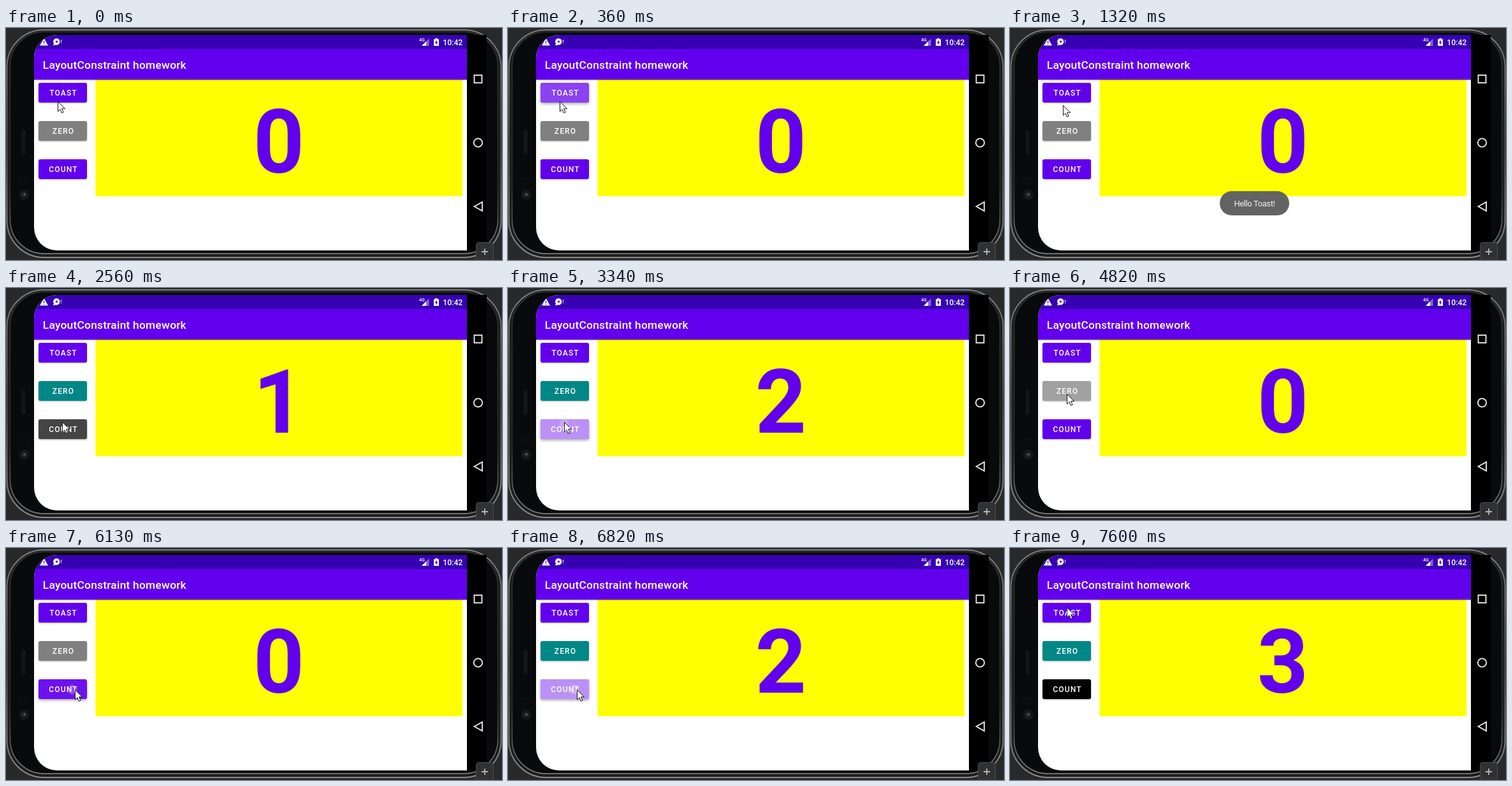
Animation, 778 px wide and 364 px high, one loop 8 s. Source, as an HTML page:

```html
<!DOCTYPE html>
<html lang="en">
<head>
<meta charset="utf-8">
<title>Counter app</title>
<style>
html, body { margin: 0; width: 100%; height: 100%; overflow: hidden; background: #27292b; }
svg { display: block; width: 778px; height: 364px; font-family: Roboto, sans-serif; }

.icon { fill: none; stroke: #eee; stroke-width: 1.8; }
.title { font-size: 17.4px; font-weight: 500; letter-spacing: .0125em; }
.label { font-size: 12.1px; font-weight: 500; letter-spacing: .0893em; text-anchor: middle; }
.digits { font-size: 140px; font-weight: 700; text-anchor: middle; fill: #6200ee; }
.button, .wash { x: 51px; width: 76px; height: 31px; rx: 3px; }
.button { filter: drop-shadow(0 1px 1px rgba(0,0,0,.3)); }
.wash { fill: #fff; opacity: 0; }

/* Every change is a hard step within the 8 s loop. */
.anim { animation: 8s step-end infinite; }
#toastBtn { fill: #6200ee; animation-name: toastLift; }
#zeroBtn { fill: #808080; animation-name: zeroColor, zeroLift; }
#countBtn { fill: #6200ee; animation-name: countColor, countLift; }
#toastWash { animation-name: toastWash; }
#zeroWash { animation-name: zeroWash; }
#countWash { animation-name: countWash; }
#spot { opacity: 0; animation-name: spot; }
#strip { animation-name: count; }
#toast { opacity: 0; animation-name: toast; }
#cursor { animation-name: cursor; }

@keyframes count {
  0%, 60.25% { transform: translateY(0); }
  30.5%, 78.5% { transform: translateY(-200px); }
  38.75%, 81.875% { transform: translateY(-400px); }
  43.625%, 87.125%, 100% { transform: translateY(-600px); }
}
@keyframes countColor {
  0%, 38.75%, 60.25%, 81.875% { fill: #6200ee; }
  30.5%, 43.625%, 78.5%, 87.125%, 100% { fill: #000; }
}
@keyframes zeroColor {
  0%, 60.25% { fill: #808080; }
  30.5%, 78.5%, 100% { fill: #018786; }
}
@keyframes toastLift {
  1.5% { filter: drop-shadow(0 2px 2px rgba(0,0,0,.35)); }
  0%, 6%, 100% { filter: drop-shadow(0 1px 1px rgba(0,0,0,.3)); }
}
@keyframes zeroLift {
  58.375% { filter: drop-shadow(0 2px 2px rgba(0,0,0,.35)); }
  0%, 60.25%, 100% { filter: drop-shadow(0 1px 1px rgba(0,0,0,.3)); }
}
@keyframes countLift {
  29%, 37.25%, 76.625% { filter: drop-shadow(0 2px 2px rgba(0,0,0,.35)); }
  32% { filter: drop-shadow(0 1px 1.5px rgba(0,0,0,.35)); }
  0%, 33.875%, 45.125%, 87.125%, 100% { filter: drop-shadow(0 1px 1px rgba(0,0,0,.3)); }
}
@keyframes toastWash {
  1.5% { opacity: .07; }
  3.125%, 4.625% { opacity: .26; }
  6% { opacity: .12; }
  0%, 7.5%, 100% { opacity: 0; }
}
@keyframes zeroWash {
  58.375% { opacity: .07; }
  60.25% { opacity: .26; }
  62.125% { opacity: .12; }
  0%, 63.625%, 100% { opacity: 0; }
}
@keyframes countWash {
  29%, 37.25%, 76.625% { opacity: .07; }
  30.5%, 32%, 38.75%, 40.25%, 45.125%, 78.5%, 80%, 81.875%, 87.125% { opacity: .27; }
  33.875%, 47%, 89% { opacity: .12; }
  41.75%, 85.25% { opacity: .57; }
  43.625%, 83.375% { opacity: .36; }
  0%, 35.375%, 48.625%, 90.5%, 100% { opacity: 0; }
}
@keyframes spot {
  1.5% { opacity: .25; transform: translate(82px, 109px); }
  29%, 37.25%, 41.75% { opacity: .2; transform: translate(88px, 213px); }
  58.375% { opacity: .25; transform: translate(89px, 166px); }
  76.625%, 85.25% { opacity: .25; transform: translate(104px, 222px); }
  0%, 3.125%, 30.5%, 38.75%, 43.625%, 60.25%, 78.5%, 87.125%, 100% { opacity: 0; transform: none; }
}
@keyframes toast {
  4.625% { opacity: .5; }
  6% { opacity: .9; }
  7.5% { opacity: 1; }
  29% { opacity: .8; }
  30.5% { opacity: .3; }
  0%, 32%, 100% { opacity: 0; }
}
@keyframes cursor {
  0% { transform: translate(81px, 115px); }
  16.5% { transform: translate(83px, 121px); }
  18.125% { transform: translate(94px, 158px); }
  19.875% { transform: translate(95px, 185px); }
  21.375% { transform: translate(95px, 208px); }
  23% { transform: translate(93px, 216px); }
  24.5% { transform: translate(90px, 213px); }
  26% { transform: translate(88px, 210px); }
  47% { transform: translate(91px, 196px); }
  48.625% { transform: translate(93px, 171px); }
  50.5% { transform: translate(90px, 166px); }
  52.25% { transform: translate(89px, 166px); }
  67% { transform: translate(100px, 194px); }
  68.875% { transform: translate(105px, 211px); }
  70.375% { transform: translate(109px, 221px); }
  71.875% { transform: translate(108px, 222px); }
  90.5% { transform: translate(107px, 203px); }
  92% { transform: translate(100px, 145px); }
  93.5% { transform: translate(92px, 106px); }
  95%, 100% { transform: translate(89px, 93px); }
}
</style>
</head>
<body>
<svg viewBox="0 0 778 364">
  <defs>
    <clipPath id="screen"><path d="M723 11H80A36 36 0 0 0 44 47V313A36 36 0 0 0 80 349H723Z"/></clipPath>
    <clipPath id="panel"><rect x="141" y="82" width="575" height="182"/></clipPath>
    <clipPath id="buttons">
      <rect x="51" y="86" width="76" height="31" rx="3"/>
      <rect x="51" y="146" width="76" height="31" rx="3"/>
      <rect x="51" y="206" width="76" height="31" rx="3"/>
    </clipPath>
    <linearGradient id="rim" x2="0" y2="1">
      <stop stop-color="#808080"/><stop offset=".5" stop-color="#4c4c4c"/><stop offset="1" stop-color="#8c8c8c"/>
    </linearGradient>
    <linearGradient id="edge" x2="0" y2="1">
      <stop stop-color="#333"/><stop offset=".7" stop-color="#2a2a2a"/><stop offset="1" stop-color="#8a8a8a"/>
    </linearGradient>
  </defs>

  <!-- Phone body -->
  <rect width="778" height="364" fill="#27292b"/>
  <rect x="1.5" y="3" width="775" height="357" rx="58" fill="#1c1c1c" stroke="url(#rim)" stroke-width="2"/>
  <rect x="6.500" y="6" width="765" height="348" rx="53" fill="#090a0b" stroke="url(#edge)" stroke-width="1.500"/>
  <rect x="723" y="11" width="31" height="338" fill="#000"/>
  <rect x="25.500" y="160.500" width="4" height="37" rx="2" fill="#141414" stroke="#1d1d1d"/>
  <ellipse cx="28" cy="240" rx="8" ry="4.500" fill="#0b0b0b" stroke="#161616"/>
  <circle cx="28.500" cy="261.500" r="8.500" fill="#151515"/>
  <circle cx="28.500" cy="261.500" r="4" fill="#262626"/>
  <circle cx="29" cy="261" r="1.500" fill="#666"/>

  <!-- Navigation -->
  <g class="icon">
    <rect x="734.500" y="74" width="12" height="12"/>
    <circle cx="740.500" cy="180" r="6.700"/>
    <path d="M734.500 280 747 273V287Z"/>
  </g>

  <g clip-path="url(#screen)">
    <rect x="44" y="11" width="679" height="338" fill="#fff"/>
    <rect x="140.500" y="81" width="575.500" height="183" fill="#ff0"/>
    <rect x="44" y="81" width="679" height="1" opacity=".25"/>
    <rect x="44" y="82" width="679" height="1" opacity=".08"/>
    <rect x="44" y="33" width="679" height="48" fill="#6200ee"/>
    <rect x="44" y="11" width="679" height="22" fill="#3700b3"/>

    <!-- Status bar -->
    <g fill="#fff">
      <path d="M59.500 16 66 27.500H53Z"/>
      <path d="M59.500 20V23.500M59.500 24.700V26" stroke="#3700b3" stroke-width="1.300"/>
      <path d="M74 27.500 75 24.500A5.200 5.200 0 1 1 78 26.500Z"/>
      <circle cx="79.500" cy="21.300" r="1.600" fill="#3700b3"/>
      <path d="M86.500 18.500V22M86.500 23V24.300" stroke="#fff"/>
      <text x="648" y="21" font-size="7" font-weight="500">4G</text>
      <path d="M663.500 16.500V28H652Z" opacity=".4"/>
      <path d="M659 21V28H652Z"/>
      <path d="M671 17.500H673.500V16H676.500V17.500H679V28H671Z"/>
      <path d="M675.700 18.800 672.800 23.300H674.500V26.800L677.300 22.200H675.700Z" fill="#3700b3"/>
      <text x="685.300" y="27" font-size="12.200" font-weight="500">10:42</text>
      <text class="title" x="57.800" y="64">LayoutConstraint homework</text>
    </g>

    <g clip-path="url(#panel)">
      <g id="strip" class="digits anim">
        <text x="428" y="226.500">0</text>
        <text x="428" y="426.500">1</text>
        <text x="428" y="626.500">2</text>
        <text x="428" y="826.500">3</text>
      </g>
    </g>

    <!-- Buttons -->
    <rect id="toastBtn" class="button anim" y="86"/>
    <rect id="zeroBtn" class="button anim" y="146"/>
    <rect id="countBtn" class="button anim" y="206"/>
    <rect id="toastWash" class="wash anim" y="86"/>
    <rect id="zeroWash" class="wash anim" y="146"/>
    <rect id="countWash" class="wash anim" y="206"/>
    <g clip-path="url(#buttons)"><circle id="spot" class="anim" r="7.500" fill="#fff"/></g>
    <g class="label" fill="#fff">
      <text x="90" y="106">TOAST</text>
      <text x="90" y="166">ZERO</text>
      <text x="90" y="226">COUNT</text>
    </g>

    <g id="toast" class="anim">
      <rect x="329" y="256" width="109" height="38" rx="19" fill="#636363"/>
      <text x="383.500" y="280" font-size="13" letter-spacing="-.4" text-anchor="middle" fill="#f4f4f4">Hello Toast!</text>
    </g>
  </g>

  <!-- Expand button -->
  <path d="M737.500 364V340.500A4 4 0 0 1 741.500 336.500H760.500A4 4 0 0 1 764.500 340.500V364" fill="#2f3133" stroke="#4a4c4e"/>
  <path d="M746 351H756M751 346V356" stroke="#b4b6b8" stroke-width="1.800"/>

  <path id="cursor" class="anim" d="M.5 .5V16L4 12.700 6.400 18.300 9 17.200 6.600 11.700H11.500Z" fill="#fff" stroke="#111"/>
</svg>
</body>
</html>
```
